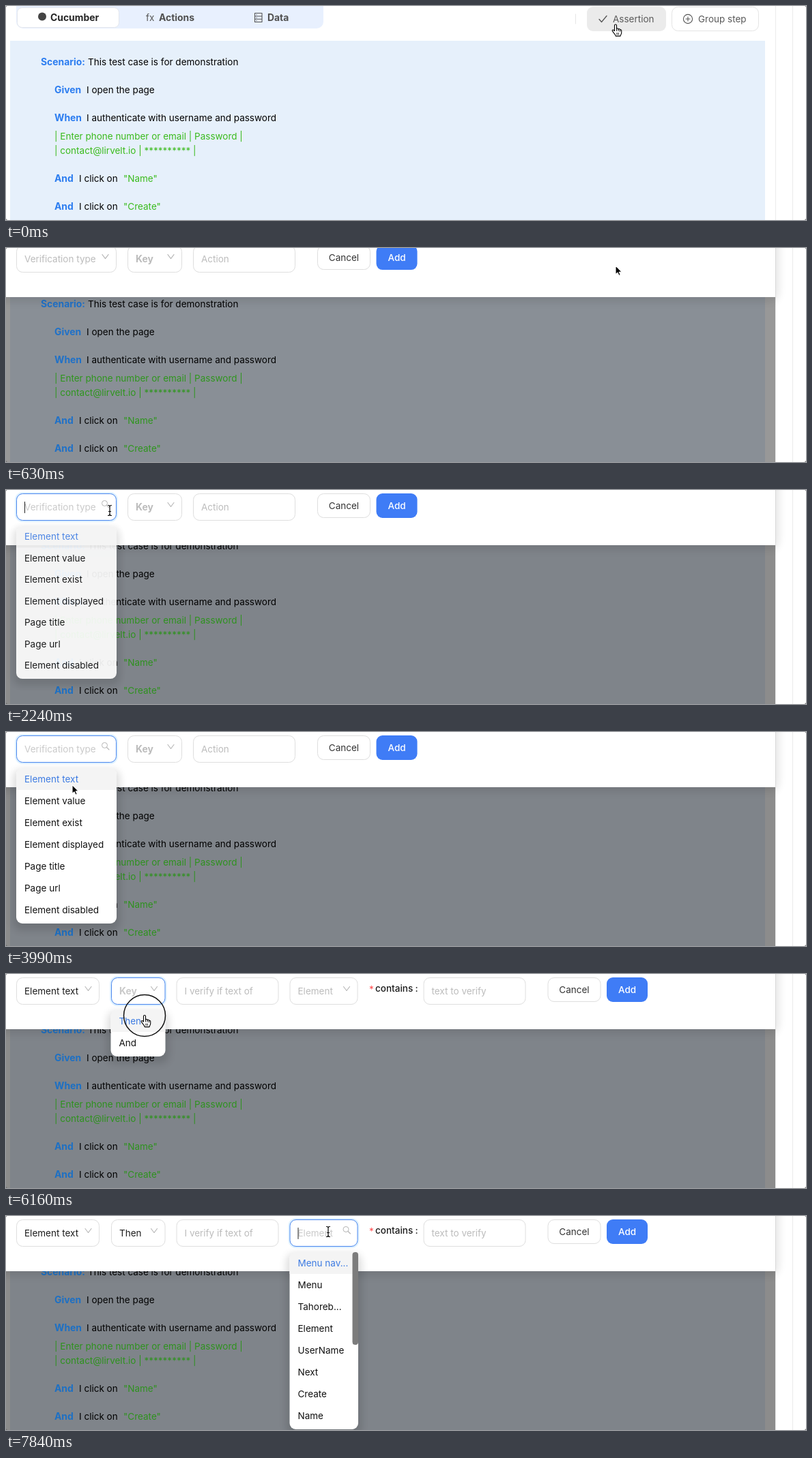
Recreate the animation shown at these times as an HTML page. Size 1172 by 314 pixels, loop 8000 ms.

```html
<!DOCTYPE html>
<html lang="en">
<head>
<meta charset="utf-8">
<title>Add an assertion</title>
<style>
html, body { margin: 0; width: 100%; height: 100%; overflow: hidden; background: #fff; }
svg { display: block; width: 1172px; height: 314px; }
text { font: 13.5px Inter, "Open Sans", sans-serif; white-space: pre; }
.b { font-weight: 700; font-size: 13.9px; }
.m { font-weight: 500; }
.line { fill: none; stroke-linecap: round; stroke-linejoin: round; }
</style>
</head>
<body>
<svg viewBox="0 0 1172 314" xmlns="http://www.w3.org/2000/svg">
  <defs>
    <filter id="soft" x="-30%" y="-30%" width="160%" height="160%"><feGaussianBlur stdDeviation="6"/></filter>
  </defs>
  <rect width="1172" height="314" fill="#fff"/>
  <g id="head"></g>
  <rect x="6" y="51" width="1106" height="263" fill="#e6f0fb"/>
  <rect id="mask" width="1127" height="314" fill="#000"/>
  <g id="steps"></g>
  <path d="M1127.5 0V314M1152.5 0V314" stroke="#ebebeb"/>
  <g id="drawer"></g>
  <g id="menus"></g>
  <path d="M0 311v3h3q-3 0-3-3zM1172 311v3h-3q3 0 3-3zM0 2v-2h2q-2 0-2 2zM1172 2v-2h-2q2 0 2 2z" fill="#666"/>
  <g id="cursor"></g>
</svg>
<script>
const LOOP = 8000;
const BLUE = '#3f7cf6', EDGE = '#dedede', HINT = '#bcbcbc', INK = '#1c1c1c';
const T = { drawer: 250, open1: 2150, pick1: 4060, open2: 5560, pick2: 6300, open3: 7520 };
const TYPES = ['Element text', 'Element value', 'Element exist', 'Element displayed', 'Page title', 'Page url', 'Element disabled'];
const KEYS = ['Then', 'And'];
const ELEMENTS = ['Menu nav...', 'Menu', 'Tahoreb...', 'Element', 'UserName', 'Next', 'Create', 'Name'];

const $ = id => document.getElementById(id);
const clamp = v => Math.max(0, Math.min(1, v));
const mix = (a, b, p) => `rgb(${a.map((v, i) => Math.round(v + (b[i] - v) * p))})`;
const text = (x, y, s, fill = '#000', cls = '', anchor = 'start') =>
  `<text x="${x}" y="${y}" fill="${fill}" class="${cls}" text-anchor="${anchor}">${s}</text>`;
const rect = (x, y, w, h, r, fill, stroke = 'none') =>
  `<rect x="${x}" y="${y}" width="${w}" height="${h}" rx="${r}" fill="${fill}" stroke="${stroke}"/>`;
const line = (d, stroke, w = 1.1) => `<path class="line" d="${d}" stroke="${stroke}" stroke-width="${w}"/>`;

$('head').innerHTML =
  rect(15, -12, 450, 45, 10, '#e8f0fe') +
  rect(16.5, 2.5, 149, 29, 7, '#fff', '#e3e6ec') +
  '<circle cx="53" cy="15.5" r="6" fill="#444"/>' +
  text(65, 22, 'Cucumber', '#262626', 'b') +
  '<text x="205" y="21.5" fill="#555" font-style="italic">fx</text>' +
  text(224, 22, 'Actions', '#505050', 'b') +
  line('M364.5 10.5h10.500v13h-10.500zM364.500 15h10.500M364.500 19.300h10.500M367 12.800h.3M367 17.200h.3M367 21.500h.3', '#555') +
  text(383, 22, 'Data', '#505050', 'b') +
  line('M834.5 12V26', '#e6e6e6', 1) +
  rect(851, 1, 116, 36, 9, '#ebebeb') +
  line('M869 19.500l3.500 4 7.500-9', '#555', 1.3) +
  text(889, 24, 'Assertion', '#595959') +
  rect(975.5, 1.5, 127, 35, 9, '#fff', '#e4e4e4') +
  '<circle cx="999" cy="19" r="6.600" fill="none" stroke="#555" stroke-width="1.100"/>' +
  line('M996 19h6M999 16v6', '#555') +
  text(1014, 24, 'Group step', '#595959');

function steps(dim) {
  const blue = mix([44, 125, 240], [29, 112, 196], dim);
  const green = mix([58, 187, 29], [46, 146, 30], dim);
  const step = (y, key, x, s, arg) =>
    text(71, y, key, blue, 'b') + text(x, y, s) + (arg ? text(172, y, arg, green) : '');
  return text(51, 86.5, 'Scenario:', blue, 'b') +
    text(120, 86.5, 'This test case is for demonstration') +
    step(127.5, 'Given', 118, 'I open the page') +
    step(168.5, 'When', 118, 'I authenticate with username and password') +
    text(71, 195.5, '| Enter phone number or email | Password |', green) +
    text(71, 216.5, '| contact@lirvelt.io | ********** |', green) +
    step(257.5, 'And', 107, 'I click on', '"Name"') +
    step(298.5, 'And', 107, 'I click on', '"Create"');
}

// A field: o holds value, hint, bold, icon, hover, focus, caret
function field(x, w, o) {
  const glow = o.focus ? `<rect x="${x - .5}" y="4.5" width="${w + 1}" height="41" rx="10" fill="none" stroke="#0591ff" stroke-opacity=".13" stroke-width="3"/>` : '';
  const end = x + w - 16.5;
  const icon = {
    down: line(`M${end - 4.5} 18.500l4.500 6 4.500-6`, '#b5b5b5'),
    find: `<circle cx="${end - 1}" cy="19.500" r="4" fill="none" stroke="#b5b5b5"/>` + line(`M${end + 2} 22.500l3.500 3.500`, '#b5b5b5')
  }[o.icon] || '';
  return glow + rect(x + .5, 5.5, w - 1, 39, 9, '#fff', o.focus || o.hover ? '#4a86ee' : EDGE) +
    text(x + 12, 29.8, o.value || o.hint, o.value ? INK : o.open ? '#cacaca' : HINT, o.bold && !o.value ? 'b' : '') +
    icon + (o.caret ? line(`M${x + 12.5} 17.500V33.500`, '#222', 1) : '');
}

const buttons = x =>
  rect(x + .5, 5.5, 77, 35, 9, '#fff', EDGE) + text(x + 39, 28, 'Cancel', '#333', '', 'middle') +
  rect(x + 86.500, 5, 60, 36, 9, BLUE) + text(x + 116.500, 28, 'Add', '#fff', 'm', 'middle');

const blink = (t, from) => Math.floor((t - from) / 500) % 2 === 0;

function form(t) {
  if (t < T.pick1) {
    const open = t >= T.open1;
    return field(15, 147, { hint: 'Verification type', icon: open ? 'find' : 'down', hover: t > 1960, focus: open, open,
        caret: open && (t < 2300 || blink(t, 2300)) }) +
      field(178, 80, { hint: 'Key', bold: true, icon: 'down' }) +
      field(274, 150, { hint: 'Action' }) + buttons(456);
  }
  const first = t < 5480, open3 = t >= T.open3;
  return field(15, 122, { value: 'Element text', icon: 'down', focus: first, caret: first && blink(t, T.pick1) }) +
    field(154, 79.5, { hint: 'Key', value: t >= T.pick2 ? 'Then' : '', bold: true, icon: 'down',
      hover: t > 5000 && t < 5500, focus: t >= 5500 && !open3, open: t >= T.open2 }) +
    field(249.5, 150, { hint: 'I verify if text of' }) +
    field(415.5, 100, { hint: 'Element', icon: open3 ? 'find' : 'down', hover: t > 7420, focus: open3, open: open3,
      caret: open3 && blink(t, T.open3) }) +
    text(532, 27, '*', '#ff4d4f') + text(541, 25.5, 'contains', INK, 'm') + text(599.5, 25.5, ':', INK, 'm') +
    field(611.5, 150, { hint: 'text to verify' }) + buttons(793.5);
}

// Drop-down unfolds from its top edge, then folds back
function menu(t, x, w, items, open, close, scroll) {
  if (t < open || t > close + 200) return '';
  const shown = t < close
    ? 1 - Math.pow(1 - clamp((t - open) / 200), 4)
    : 1 - Math.pow(clamp((t - close) / 200), 4);
  const h = items.length * 32 + 4;
  return `<g transform="translate(${x} 53) scale(1 ${.8 + .2 * shown})" opacity="${shown}">` +
    `<rect x="-5" y="2" width="${w + 10}" height="${h + 8}" rx="12" opacity=".13" filter="url(#soft)"/>` +
    rect(0, 0, w, h, 9, '#fff') +
    `<path d="M0 32V9q0-9 9-9H${w - 9}q9 0 9 9v23z" fill="#f4f4f4"/>` +
    items.map((s, i) => text(12, 20.8 + i * 32, s, i ? '#111' : '#3d7be2')).join('') +
    (scroll ? rect(w - 8.5, 0, 8.5, 136, 4, '#7c7c7c') : '') + '</g>';
}

const PATH = [
  [0, 893, 27.5], [70, 893, 27], [140, 893, 25.5], [910, 893, 26], [1120, 334, 58], [1400, 334, 58],
  [2100, 152, 30], [3010, 152, 30], [3430, 124, 92], [3850, 100, 82], [3990, 97, 77.5], [4060, 97, 77.5],
  [4340, 137, 73], [4550, 137, 73], [4760, 152, 79], [5110, 205, 29], [5250, 205, 29], [5460, 220, 30],
  [5670, 220, 30], [5950, 203, 61], [6720, 203, 61], [7490, 472, 23], [LOOP, 472, 23]
];
const SHAPES = [[0, 'hand'], [280, 'arrow'], [1960, 'beam'], [3150, 'arrow'], [5000, 'hand'], [6510, 'arrow'], [7440, 'beam']];
const POINTERS = {
  arrow: '<path d="M0 0V13l3-2.700 2 4.400 2.300-1-2-4.300H9.400z" fill="#000" stroke="#fff" stroke-width="1.100" stroke-linejoin="round"/>',
  hand: '<path d="M-1.500 9V1a1.500 1.500 0 0 1 3 0v5.500c0-1.600 2.600-1.600 2.600 0v.6c0-1.400 2.400-1.400 2.400.2v.8c0-1.200 2.200-1.200 2.200.4v3.300c0 2.600-1.600 2.800-1.600 4.800h-6.900c-.3-2.600-3.600-4.800-4.900-7.600c-.5-1.200.8-2 1.800-1.200z" fill="#fff" stroke="#000" stroke-width="1.100" stroke-linejoin="round"/>' +
    line('M1.500 6.500v2.500M4.100 7v2.300M6.500 8v1.800M2 12v2.500M4.200 12v2.500', '#000', .9),
  beam: ['#fff', '#000'].map((c, i) => line('M-2.500-7.500q2.500 0 2.500 2v11q0 2-2.500 2M2.500-7.500q-2.500 0-2.500 2v11q0 2 2.500 2M-1.500 1.500h3', c, i ? 1.2 : 2.6)).join('')
};

function cursor(t) {
  let i = 0;
  while (i < PATH.length - 2 && PATH[i + 1][0] <= t) i++;
  const [t0, x0, y0] = PATH[i], [t1, x1, y1] = PATH[i + 1];
  const p = clamp((t - t0) / (t1 - t0)), e = p * p * (3 - 2 * p);
  const x = x0 + (x1 - x0) * e, y = y0 + (y1 - y0) * e;
  const shape = SHAPES.filter(s => s[0] <= t).pop()[1];
  const pressed = (t >= 5530 && t < 5670) || (t >= 6090 && t < T.pick2);
  return `<g transform="translate(${x} ${y})">` +
    (pressed ? '<circle r="30.500" fill="none" stroke="#111" stroke-width="1.500"/>' : '') +
    POINTERS[shape] + '</g>';
}

const last = {};
function put(id, html) {
  if (last[id] !== html) $(id).innerHTML = last[id] = html;
}

function draw(t) {
  const left = 1 - clamp((t - T.drawer) / 560);
  const dim = 1 - left * left;
  const lift = 274 * left ** 3;
  $('mask').setAttribute('opacity', .45 * dim);
  put('steps', steps(dim));
  put('drawer', left === 1 ? '' : `<g transform="translate(0 ${-lift})">` +
    '<rect x="-20" y="-300" width="1153" height="388" rx="14" opacity=".09" filter="url(#soft)"/>' +
    rect(0, -300, 1127, 381, 0, '#fff') + form(t) + '</g>');
  put('menus', menu(t, 15, 147, TYPES, T.open1, T.pick1) +
    menu(t, 153.5, 80, KEYS, T.open2, T.pick2) +
    menu(t, 415.5, 100.5, ELEMENTS, T.open3, LOOP, true));
  put('cursor', cursor(t));
}

function tick() {
  draw(performance.now() % LOOP);
  requestAnimationFrame(tick);
}
tick();
</script>
</body>
</html>
```
